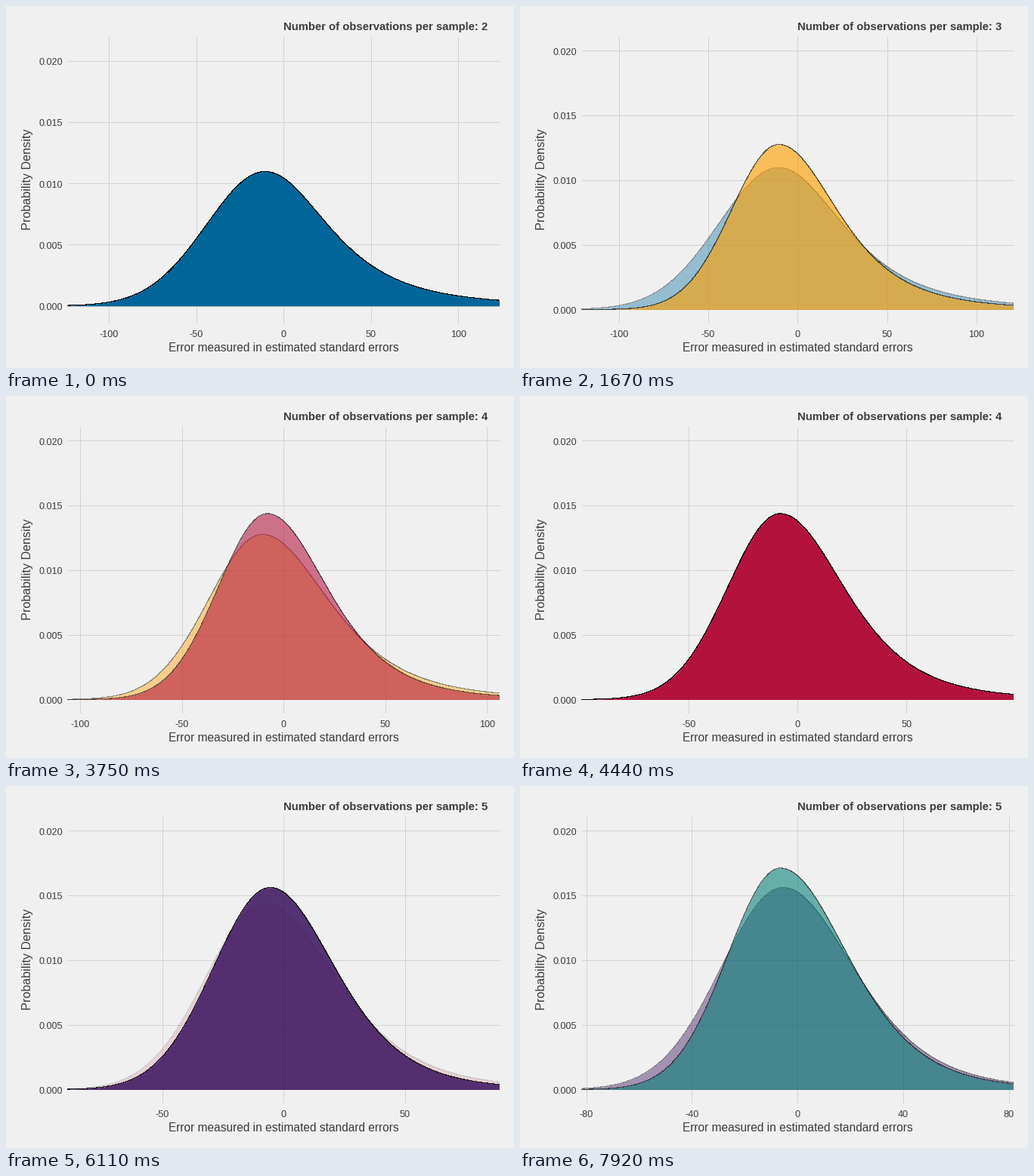
Write a matplotlib script that moves like this. It is 672 by 480 pixels and loops after 8000 ms.

```python
import numpy as np
import matplotlib.pyplot as plt
from matplotlib.animation import FuncAnimation

WIDTH, HEIGHT, DPI = 672, 480, 96
LOOP_MS, INTERVAL, STEP_MS = 8000, 20, 138.89
LEFT, RIGHT, TOP, BOTTOM = 81.5, 652, 40, 419
CENTER = (LEFT + RIGHT) / 2
BACKGROUND, GRID, INK = "#f0f0f0", "#d2d2d2", "#3c3c3c"

# Sample size: colour, mode, peak density, half widths at half height.
CURVES = {
    2: ("#006699", -10.5, 0.01096, 39.5, 43),
    3: ("#ffa000", -10.5, 0.01275, 31, 39),
    4: ("#b3123c", -8, 0.01436, 28.3, 35),
    5: ("#3c135e", -5.5, 0.0156, 27.5, 31.7),
    6: ("#017e77", -6.5, 0.0171, 23.5, 30.4),
}
TAIL_SCALE = 65
HALF_WIDTHS = {1: 69.85, 2: 131.05, 3: 110.15, 4: 99.05, 5: 82.75, 6: 79.7}
FIRST_Y, USUAL_Y = (-0.0038, 0.0282), (-0.00099, 0.02108)
PAN_STEPS = 8

fig = plt.figure(figsize=(WIDTH / DPI, HEIGHT / DPI), dpi=DPI, facecolor=BACKGROUND)
ax = fig.add_axes([0, 0, 1, 1])
ax.set(xlim=(-0.5, WIDTH - 0.5), ylim=(HEIGHT - 0.5, -0.5))
ax.axis("off")
plt.rcParams["font.family"] = "Liberation Sans"


def px(size):
    return size * 72 / DPI


def mix(a, b, t):
    return a + (b - a) * t


def label(x, y, text, size, **style):
    return ax.text(x, y, text, fontsize=px(size), color=INK, va="baseline", **style)


def grid_line(xs, ys):
    return ax.plot(xs, ys, color=GRID, lw=px(1), zorder=1)[0]


def density(size, x):
    """Bell with a Gaussian left side and a heavier, Student-like right tail."""
    _, mode, peak, left, right = CURVES[size]
    u = x - mode
    power = np.log(2) / np.log1p((right / TAIL_SCALE) ** 2)
    return peak * np.where(u < 0, 0.5 ** ((u / left) ** 2),
                           (1 + (u / TAIL_SCALE) ** 2) ** -power)


label(CENTER, 458, "Error measured in estimated standard errors", 15.55, ha="center")
label(33, 229, "Probability Density", 16.1, ha="center", rotation=90,
      rotation_mode="anchor")
title = label(637, 31.5, "", 14.85, ha="right", weight="bold")
columns = np.linspace(LEFT, RIGHT, 572)
live = []


def draw_axes(half, to_x, to_y):
    spacing = 40 if half < 83.8 else 50
    for value in range(-2 * spacing, 2 * spacing + 1, spacing):
        if abs(value) < 0.995 * half:
            x = to_x(value)
            live.append(grid_line([x, x], [TOP, BOTTOM]))
            live.append(label(x, 438.5, str(value), 12.6, ha="center"))
    for value in np.arange(5) * 0.005:
        y = to_y(value)
        live.append(grid_line([LEFT, RIGHT], [y, y]))
        live.append(label(75, y + 5.5, f"{value:.3f}", 12.6, ha="right"))


def draw_density(size, alpha, half, to_y, order):
    x = (columns - CENTER) / (RIGHT - CENTER) * half
    y = to_y(density(size, x))
    live.append(ax.fill_between(columns, y, to_y(0), color=CURVES[size][0], lw=0,
                                alpha=alpha, zorder=order))
    # Without antialiasing every touched pixel is filled, so a hairline is 1 px.
    live.extend(ax.plot(columns, y, color="black", lw=px(0.1), alpha=alpha,
                        zorder=order + 0.5, antialiased=False))


def transition(step):
    """Sample size being shown, with the progress of its fade and of the view."""
    starts = [round(46 * k / 3) - 8 for k in range(5)]
    k = sum(start < step for start in starts) - 1
    elapsed = step - starts[k]
    fade = min(1, elapsed / (15 * k - starts[k]))
    return k + 2, fade, min(1, (elapsed - 1) / PAN_STEPS)


def update(frame):
    while live:
        live.pop().remove()
    size, fade, pan = transition(int((frame * INTERVAL + 15) / STEP_MS))
    half = mix(HALF_WIDTHS[size - 1], HALF_WIDTHS[size], pan)
    previous_y = FIRST_Y if size == 2 else USUAL_Y
    low, high = (mix(a, b, pan) for a, b in zip(previous_y, USUAL_Y))

    def to_x(value):
        return CENTER + value / half * (RIGHT - CENTER)

    def to_y(value):
        return BOTTOM - (value - low) / (high - low) * (BOTTOM - TOP)

    draw_axes(half, to_x, to_y)
    if fade < 1:
        draw_density(size - 1, 1 - fade, half, to_y, 3)
    draw_density(size, fade, half, to_y, 4)
    shown = size if fade > 0.55 and size != 6 else size - 1
    title.set_text(f"Number of observations per sample: {shown}")
    return live


animation = FuncAnimation(fig, update, frames=LOOP_MS // INTERVAL, interval=INTERVAL,
                          init_func=lambda: [], repeat=True, repeat_delay=0)
plt.show()
```
